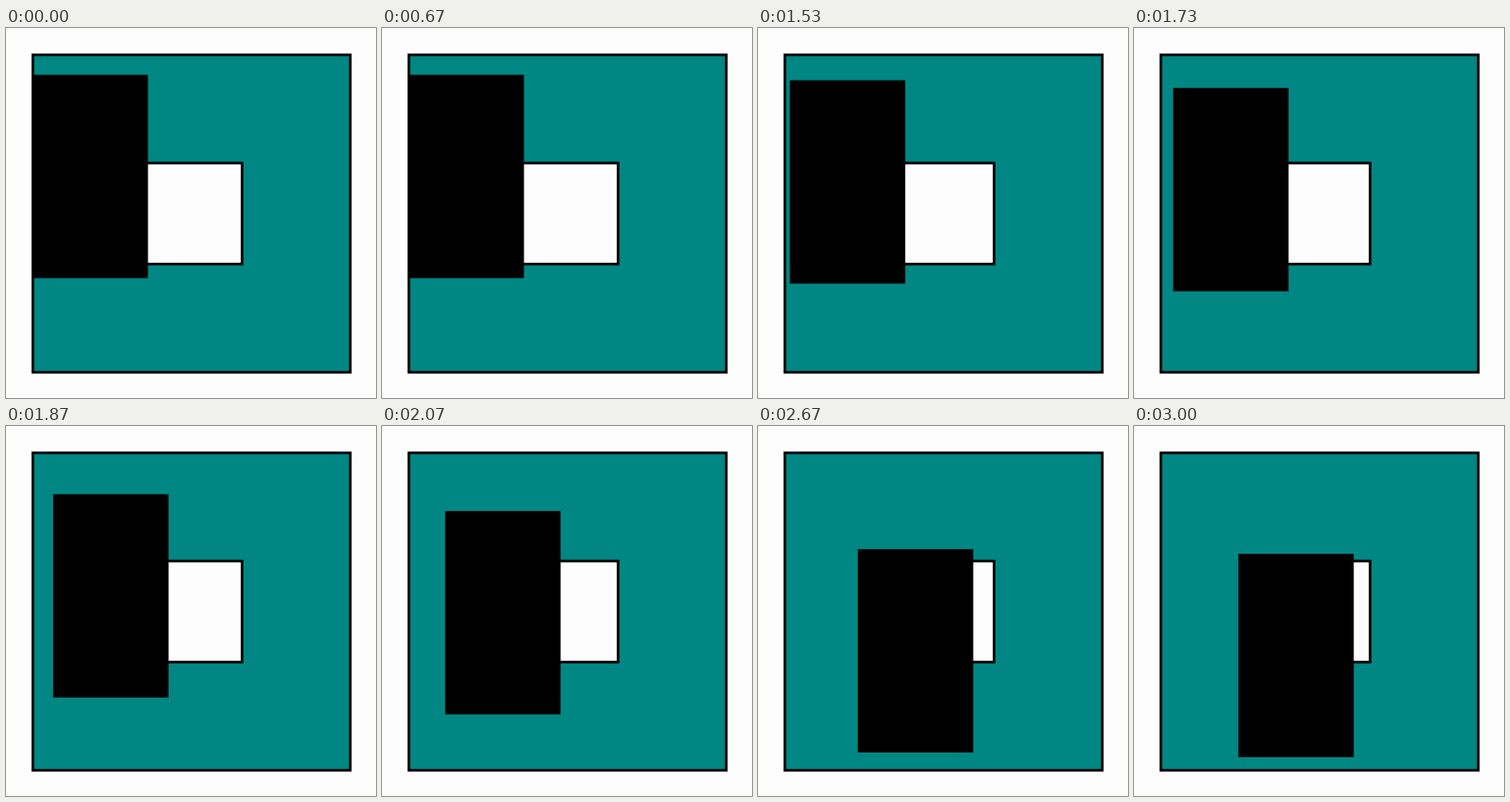
An HTML page for the animation above (3.07 s loop, 400 by 400 pixels).

```html
<!DOCTYPE html>
<html lang="en">
<head>
<meta charset="utf-8">
<title>Sliding block</title>
<style>
  html, body { margin: 0; width: 100%; height: 100%; overflow: hidden; background: #fdfdfd; }
  svg { display: block; width: 100%; height: 100%; }
</style>
</head>
<body>
<svg viewBox="0 0 400 400">
  <g stroke="#000" stroke-width="2.8">
    <rect x="29" y="29" width="343.2" height="343.2" fill="#008784"/>
    <rect x="146" y="146" width="109.2" height="109.2" fill="#fdfdfd"/>
  </g>
  <rect id="block" x="28.7" y="50.6" width="124.8" height="219.8"/>
</svg>
<script>
const LOOP = 3070, STEP = 1000 / 15;
const MOVE_START = 1095, MOVE_TIME = 2000, STEEPNESS = 8.8;
const block = document.getElementById('block');
const start = performance.now();

const sigmoid = x => 1 / (1 + Math.exp(-x));

// Sigmoid easing, rescaled to run exactly from 0 to 1
function ease(u) {
  const tail = sigmoid(-STEEPNESS / 2);
  const p = (sigmoid(STEEPNESS * (u - 0.5)) - tail) / (1 - 2 * tail);
  return Math.min(1, Math.max(0, p));
}

function draw(now) {
  const t = Math.max(0, now - start) % LOOP;
  // Hold each step; the small offset absorbs 10 ms timing rounding
  const step = Math.min(45, Math.floor((t + 4) / STEP));
  const p = ease((step * STEP - MOVE_START) / MOVE_TIME);
  block.setAttribute('transform', `translate(${84.6 * p} ${88.2 * p})`);
  requestAnimationFrame(draw);
}
draw(start);
</script>
</body>
</html>
```
